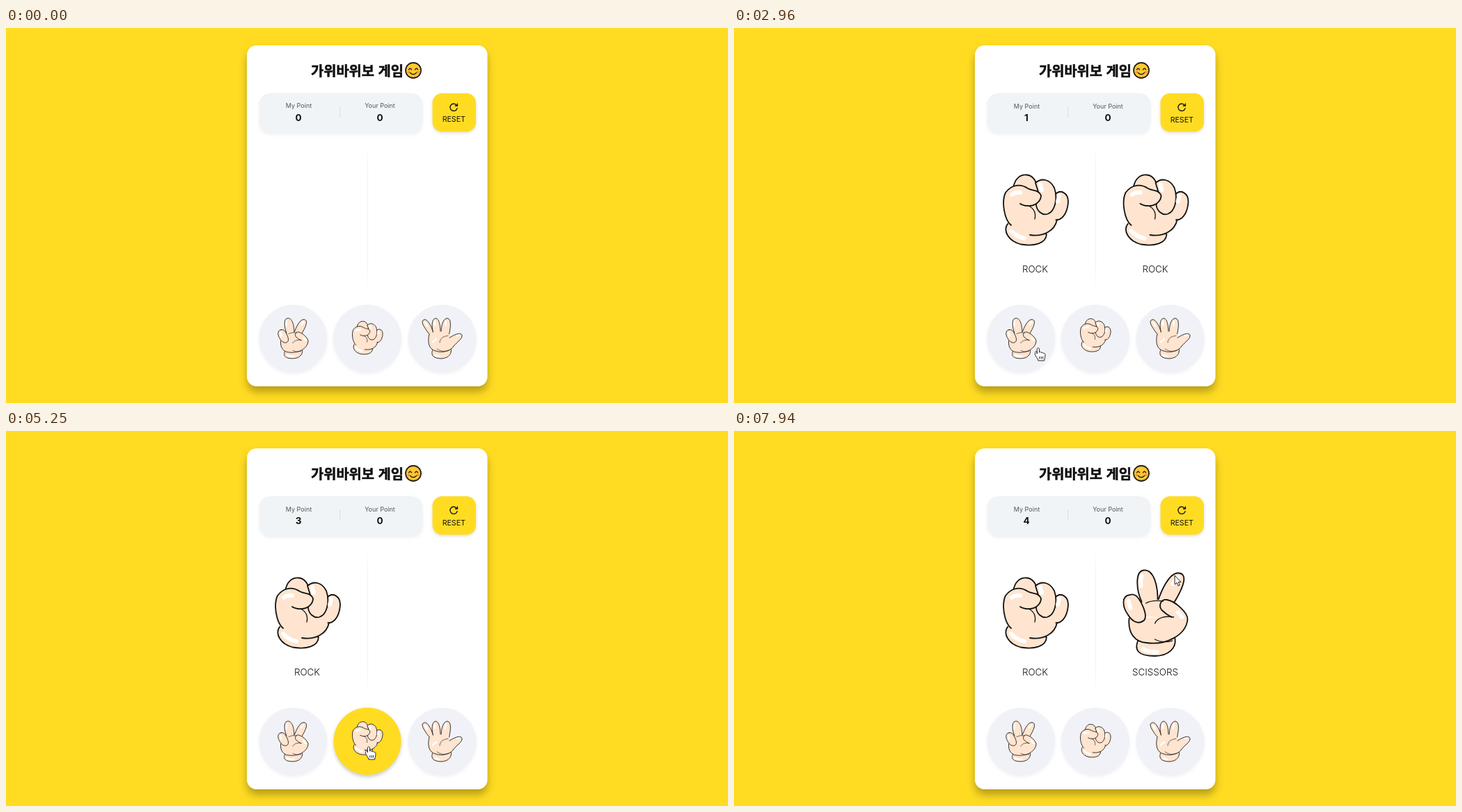
Animation, 1037 px wide and 540 px high, one loop 8 s. Source, as an HTML page:

```html
<!DOCTYPE html>
<html lang="ko">
<head>
<meta charset="utf-8">
<title>가위바위보 게임</title>
<style>
  html, body { margin: 0; width: 100%; height: 100%; overflow: hidden; background: #ffdc22; }
  svg { display: block; }
  text { font-family: Inter, sans-serif; text-anchor: middle; fill: #111; }
  .title { font: 900 19.8px "Noto Sans CJK KR", "Noto Sans CJK", sans-serif; text-anchor: start; stroke: #111; stroke-width: .5; }
  .label { font-size: 9px; fill: #555; }
  .score { font-size: 13.5px; font-weight: 700; }
  .reset { font-size: 10.6px; }
  .name { font-size: 13.4px; font-weight: 300; }
  .ink { fill: #ffe4cf; stroke: #111; stroke-width: 1.8; stroke-linecap: round; stroke-linejoin: round; }
  .skin { stroke: none; }
  .line { fill: none; stroke-width: 1.3; }
  .shine { fill: none; stroke: #fff; stroke-width: 6; }
  .card { filter: drop-shadow(0 8px 6px rgba(0,0,0,.28)); }
  .soft { filter: drop-shadow(0 2px 2px rgba(0,0,0,.05)); }
  .raised { filter: drop-shadow(0 3px 2.5px rgba(0,0,0,.2)); }
</style>
</head>
<body>
<svg width="1037" height="540" viewBox="0 0 1037 540">
  <defs>
    <linearGradient id="fade" x2="0" y2="1">
      <stop offset="0" stop-color="#fff"/><stop offset=".2" stop-color="#efefef"/>
      <stop offset=".8" stop-color="#efefef"/><stop offset="1" stop-color="#fff"/>
    </linearGradient>

    <g id="scissors" class="ink"><g transform="translate(-433 -262.5)">
      <path d="M414 248C405 230 403 202 416 200.5C430 199 437 222 436 248"/>
      <path d="M436 246C441 230 452 206 464 204.5C480 204 475 222 459 248"/>
      <path d="M408 301C402 315 407 324 432 324C452 324 463 312 461 299"/>
      <path class="skin" d="M396 266L414 246Q433 242 450 243L456 269Z"/>
      <path d="M395 270C393 292 404 304 420 305C448 309 477 294 479 271C479 262 462 245 449 243C440 242 437 252 442 258Q448 264 456 268"/>
      <path class="line" d="M419 248Q428 243 444 245M432 277C436 268 448 266 459 268M432 300Q443 306 457 302"/>
      <path d="M396 236C384 237 385 253 393 264C400 276 410 279 417 272C422 264 412 245 406 238Q401 234 396 236Z"/>
      <path class="shine" d="M413 209Q411 216 412 223"/>
      <path class="shine" d="M465 211L458 220"/>
      <path class="shine" d="M394 245L397 255"/>
      <path class="shine" d="M465 261L471 268"/>
      <path class="shine" d="M415 314Q424 319 435 318"/>
    </g></g>

    <g id="rock" class="ink"><g transform="translate(-433 -262.5)">
      <path d="M461 240C469 231 480 238 480 250C479 268 470 279 459 276L450 264Z"/>
      <path d="M393 282C386 292 394 307 412 311.500C432 315 448 310 449 297Z"/>
      <path class="skin" d="M394 233L434 222L463 262L460 291L425 299L394 283Z"/>
      <path d="M401 231C403 216 412 211 420 211.500C429 212 435 219 437 236L420 245Z"/>
      <path d="M433 223C442 215 454 218 460 230C465 244 462 264 450 268C442 270 435 263 434 255L437 236Z"/>
      <path d="M464 276C461 291 446 301 425 298M398 284C388 276 384 250 390 237C399 225 412 224 422 231C429 235 438 233 441 241C441 249 434 255 426 256Q417 257 411 253"/>
      <path class="line" d="M423 256Q435 262 432 275"/>
      <path class="shine" d="M399 240Q404 236 411 237"/>
      <path class="shine" d="M440 225L442 233"/>
      <path class="shine" d="M467 242L465 250"/>
      <path class="shine" d="M398 292Q405 300 417 303"/>
    </g></g>

    <g id="paper" class="ink"><g transform="scale(2.13) translate(-626.5 -447)" stroke-width=".85" style="stroke-width:.85">
      <path d="M609 442C603 435 595 423 599 421C604 416 611 428 614 440"/>
      <path d="M614 440C611 430 611 419 617 418C622 418 624 428 624 439"/>
      <path d="M625 439C625 428 628 418 634 418C640 419 639 430 636 443"/>
      <path d="M613 463C609 472 615 476 626 476C637 475 641 468 639 461" style="stroke-width:.85"/>
      <path class="skin" d="M608 442L614 438L625 437L637 441L639 449L622 460Z"/>
      <path d="M608 441C605 451 607 463 617 465C628 469 640 464 643 458C648 452 655 448 655 443C654 438 646 440 637 446"/>
      <path class="line" style="stroke-width:.6" d="M623 453C623 447 628 444 635 443M619 462Q627 468 636 464"/>
      <g style="stroke-width:2.6">
        <path class="shine" style="stroke-width:2.6" d="M602 424L605 429M616 422V428M632 422L631 428M613 452L618 448M648 443L651 442M616 471L622 473"/>
      </g>
    </g></g>

    <path id="pointer" d="M-4 10.500C-6 8-3-.0-1.700 8L-1.700 1.200C-1.500-.8 1.300-.8 1.500 1.200V6C3 5 4.500 5.500 4.700 6.700C6 6 7.300 6.500 7.500 7.500C9 7 10 8 10 9.500C10 14 9 15 8.500 18H0C-.5 15-3 13-4 10.500ZM1.800 12V15.500M4.300 12V15.500M6.700 12V15.500"/>
    <path id="arrow" d="M0 0V13L3 10.300L5 15L7.200 14L5.200 9.600H9Z"/>
  </defs>

  <rect width="1037" height="540" fill="#ffdc22"/>
  <rect class="card" x="346" y="25" width="345.500" height="491" rx="14" fill="#fff"/>
  <text class="title" x="438" y="69">가위바위보 게임</text>
  <g fill="none" stroke="#2a2118" stroke-width="1.500" stroke-linecap="round">
    <circle cx="585" cy="61" r="11" fill="#ffc931" stroke-width="1.800"/>
    <path d="M578.500 60Q580.500 56.500 582.500 60M587.500 60Q589.500 56.500 591.500 60M580 64Q585 69.500 590 64"/>
    <path d="M578 63.500h1M591 63.500h1" stroke="#f58b3c" stroke-width="3"/>
  </g>

  <rect class="soft" x="363.500" y="94" width="235" height="58" rx="16" fill="#f0f4f6"/>
  <path d="M479.500 113V129" stroke="#dcdfe2"/>
  <g id="labels">
    <text class="label" x="420.500" y="115">My Point</text>
    <text class="label" x="537" y="115">Your Point</text>
  </g>
  <text class="score" id="mine" x="420" y="134"></text>
  <text class="score" x="537" y="134">0</text>
  <rect class="raised" x="612.500" y="94" width="62.500" height="55.500" rx="14" fill="#ffdc22" style="filter:drop-shadow(0 2px 2px rgba(0,0,0,.12))"/>
  <path d="M647.500 111.500A5.200 5.200 0 1 0 648.200 115M648.400 108.500V112H644.800" fill="none" stroke="#111" stroke-width="1.300"/>
  <text class="reset" id="reset" x="643.300" y="135.300">RESET</text>

  <rect x="519" y="168" width="1" height="210" fill="url(#fade)"/>
  <g id="results"></g>
  <g id="buttons"></g>
  <use id="cursor" fill="#fff" stroke="#222" stroke-width="1" stroke-linejoin="round"/>
</svg>

<script>
const LOOP = 8000, LEFT_DELAY = 200, RIGHT_DELAY = 500;
const hands = ['scissors', 'rock', 'paper'];
const [SCISSORS, ROCK, PAPER, NONE] = [0, 1, 2, -1];
const buttonX = [412.4, 519, 626.5];
const get = id => document.getElementById(id);

// click time, my hand, opponent's hand, my score afterwards
const rounds = [
  [1280, SCISSORS, PAPER, 1], [2400, ROCK, ROCK, 1], [3220, SCISSORS, PAPER, 2],
  [4240, PAPER, ROCK, 3], [5000, ROCK, ROCK, 3], [5870, SCISSORS, SCISSORS, 3],
  [6830, ROCK, SCISSORS, 4]
];
// start time, hovered button
const hovers = [
  [0, NONE], [480, PAPER], [620, NONE], [700, ROCK], [930, SCISSORS],
  [1570, NONE], [1620, ROCK], [2925, NONE], [2985, SCISSORS], [3690, ROCK],
  [3750, PAPER], [4580, NONE], [4600, ROCK], [5610, NONE], [5640, SCISSORS],
  [6480, NONE], [6740, ROCK], [7530, NONE]
];
// time, x, y of the pointer tip
const path = [
  [200, 815, 536], [330, 731, 511], [480, 650, 491], [700, 560, 478], [920, 462, 460],
  [1000, 441, 453], [1500, 441, 453], [1700, 541, 453], [2860, 541, 453], [2960, 437, 461],
  [3640, 437, 461], [3850, 617, 438], [4500, 617, 438], [4680, 521, 455], [5540, 521, 455],
  [5700, 437, 455], [6440, 437, 455], [6740, 514, 433], [7450, 514, 433], [7920, 633, 208]
];

const latest = (list, t) => list.findLast(item => item[0] <= t);
const isHovered = (i, t) => latest(hovers, Math.max(t, 0))[1] === i;

get('results').innerHTML = [432.5, 605].map(x =>
  `<g><use x="${x + .5}" y="262.500"/><text class="name" x="${x}" y="352"></text></g>`).join('');
get('buttons').innerHTML = buttonX.map((x, i) =>
  `<circle cx="${x}" cy="447"/><use href="#${hands[i]}"/>`).join('');
const results = [...get('results').children];
const circles = [...get('buttons').querySelectorAll('circle')];
const icons = [...get('buttons').querySelectorAll('use')];

function showHand(side, hand) {
  side.style.display = hand === undefined ? 'none' : '';
  if (hand === undefined) return;
  side.children[0].setAttribute('href', '#' + hands[hand]);
  side.children[1].textContent = hands[hand].toUpperCase();
}

// Fraction of a short trailing window spent hovering, which eases the icon up and down
function liftAmount(i, t) {
  let sum = 0;
  for (let k = 0; k < 12; k++) sum += isHovered(i, t - 40 - k * 10);
  return sum / 12;
}

function drawButtons(t) {
  circles.forEach((circle, i) => {
    const on = isHovered(i, t);
    circle.setAttribute('r', on ? 48.5 : 49);
    circle.setAttribute('cy', on ? 446.7 : 447.5);
    circle.setAttribute('fill', on ? '#ffdc22' : '#f1f2f7');
    circle.setAttribute('class', on ? 'raised' : 'soft');
    const y = 447 - 3.7 * liftAmount(i, t) - (i === ROCK ? .7 : 0);
    icons[i].setAttribute('transform', `translate(${buttonX[i]} ${y}) scale(.47)`);
  });
}

function drawCursor(t) {
  const cursor = get('cursor'), from = latest(path, t);
  cursor.style.display = from ? '' : 'none';
  if (!from) return;
  const to = path[path.indexOf(from) + 1] || from;
  const k = to === from ? 0 : (t - from[0]) / (to[0] - from[0]);
  const x = from[1] + (to[1] - from[1]) * k, y = from[2] + (to[2] - from[2]) * k;
  const overButton = buttonX.some(cx => Math.hypot(x - cx, y - 447) < 49);
  cursor.setAttribute('href', overButton ? '#pointer' : '#arrow');
  cursor.setAttribute('transform', `translate(${x} ${y})`);
}

function draw(now) {
  const t = now % LOOP;
  const round = latest(rounds, t);
  const age = round ? t - round[0] : 0;
  showHand(results[0], age >= LEFT_DELAY ? round[1] : undefined);
  showHand(results[1], age >= RIGHT_DELAY ? round[2] : undefined);

  const scored = latest(rounds, t - RIGHT_DELAY);
  get('mine').textContent = scored ? scored[3] : 0;
  const nudge = `translate(0 ${scored ? .8 : 0})`;
  get('labels').setAttribute('transform', nudge);
  get('reset').setAttribute('transform', nudge);

  drawButtons(t);
  drawCursor(t);
}

const start = performance.now();
(function tick() {
  draw(performance.now() - start);
  requestAnimationFrame(tick);
})();
</script>
</body>
</html>
```
